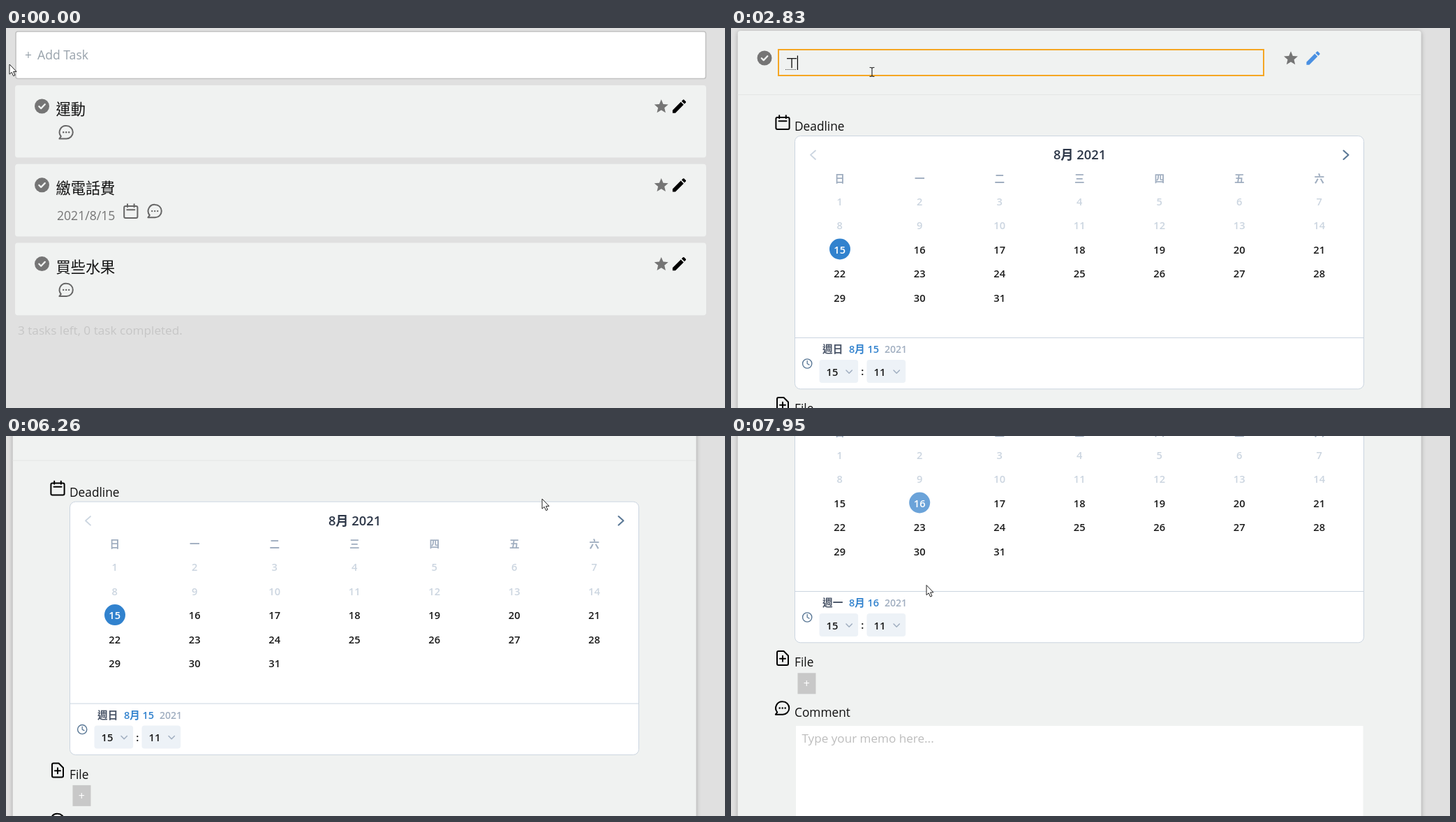
Recreate the animation shown at these times as an HTML page. Size 1030 px wide and 544 px high, loop 8 s.

```html
<!DOCTYPE html>
<html lang="zh-Hant">
<head>
<meta charset="utf-8">
<title>Task list</title>
<style>
  html, body { margin: 0; width: 100%; height: 100%; overflow: hidden; background: #e0e0e0; }
  svg { display: block; width: 100vw; height: 100vh; }
  text { font-family: "Open Sans", "Noto Sans CJK TC", "Noto Sans CJK JP", "Noto Sans CJK", sans-serif; white-space: pre; }
  .cjk { font-family: "Noto Sans CJK TC", "Noto Sans CJK JP", "Noto Sans CJK", sans-serif; font-weight: 300; }
  .semi { font-weight: 600; }
  .mid { text-anchor: middle; }
  .line { fill: none; stroke-linecap: round; stroke-linejoin: round; }
  .panel { filter: drop-shadow(0 1px 3px rgba(0, 0, 0, .28)); }
</style>
</head>
<body>
<svg id="stage" viewBox="0 0 1030 544"></svg>
<script>
const LOOP = 8000;
const CARD = '#f0f2f1', GRAY = '#757575', BLUE = '#3182ce', ORANGE = '#f5a623';
const MUTED = '#a0aec0', PALE = '#cbd5e0', SLATE = '#5a7896';

const stage = document.getElementById('stage');

function add(parent, tag, attrs = {}, content) {
  const node = document.createElementNS('http://www.w3.org/2000/svg', tag);
  for (const key in attrs) node.setAttribute(key, attrs[key]);
  if (content !== undefined) node.textContent = content;
  parent.appendChild(node);
  return node;
}
const group = (parent, x = 0, y = 0, scale = 1) =>
  add(parent, 'g', { transform: `translate(${x} ${y}) scale(${scale})` });
const rect = (parent, x, y, width, height, fill, rx = 0, more = {}) =>
  add(parent, 'rect', { x, y, width, height, fill, rx, ...more });
const label = (parent, x, y, size, fill, content, cls = '') =>
  add(parent, 'text', { x, y, 'font-size': size, fill, class: cls }, content);
const stroke = (parent, d, color, width = 2) =>
  add(parent, 'path', { d, class: 'line', stroke: color, 'stroke-width': width });
const show = (node, on) => node.setAttribute('visibility', on ? 'inherit' : 'hidden');
const place = (node, x, y) => node.setAttribute('transform', `translate(${x} ${y})`);

// Icons, each centred on x, y
function checkIcon(parent, x, y) {
  const g = group(parent, x, y);
  add(g, 'circle', { r: 10.5, fill: GRAY });
  stroke(g, 'M-4.2 .2L-1.3 3.1L4.3-2.7', CARD, 2.3);
}
function starIcon(parent, x, y) {
  const g = group(parent, x - 12, y - 11.7);
  return add(g, 'path', { fill: GRAY, d: 'M12 17.27 18.18 21l-1.64-7.03L22 9.24l-7.19-.61L12 2 9.19 8.63 2 9.24l5.46 4.73L5.82 21z' });
}
function pencilIcon(parent, x, y, fill) {
  const g = group(parent, x - 12.8, y - 12.8, 1.07);
  add(g, 'path', { fill, d: 'M3 17.25V21h3.75L17.81 9.94l-3.75-3.75L3 17.25zM20.71 7.04c.39-.39.39-1.02 0-1.41l-2.34-2.34a1 1 0 0 0-1.41 0l-1.83 1.83 3.75 3.75z' });
}
function commentIcon(parent, x, y, color) {
  const g = group(parent, x, y);
  stroke(g, 'M.6-9.2A9.2 9.2 0 1 1 .6 9.2H-9.6L-7.2 5.9A9.2 9.2 0 0 1 .6-9.2z', color);
  for (const dx of [-3.8, .2, 4.2]) add(g, 'circle', { cx: dx, r: 1.2, fill: color });
}
function calendarIcon(parent, x, y, color) {
  const g = group(parent, x, y);
  rect(g, -9.6, -7.3, 19.2, 17, 'none', 2, { stroke: color, 'stroke-width': 2 });
  stroke(g, 'M-4.8-10V-6M4.8-10V-6M-5.5-2H5.5', color);
}
function fileIcon(parent, x, y) {
  stroke(group(parent, x, y), 'M1.5-10H-6a2 2 0 0 0-2 2V8a2 2 0 0 0 2 2H6a2 2 0 0 0 2-2V-3.5zM0-3.2V4.8M-4 .8H4', '#000');
}

// Task list
const list = group(stage);
rect(list, 14, 5, 988.5, 67.5, '#fff', 3, { stroke: '#c2c2c2', 'stroke-width': 1.6 });
label(list, 27, 45, 17.4, '#98a2ab', '+');
label(list, 45, 45, 17.6, '#98a2ab', 'Add Task');
['運動', '繳電話費', '買些水果'].forEach((name, i) => {
  const card = group(list, 0, 82 + i * 112.8);
  const dated = i === 1;
  rect(card, 13, 0, 990, 103.6, CARD, 4);
  checkIcon(card, 51.5, 30);
  label(card, 71.5, 42, 21.2, '#111', name, 'cjk');
  starIcon(card, 938.7, 30);
  pencilIcon(card, 964.5, 30, '#000');
  if (dated) {
    label(card, 73, 80, 17.6, GRAY, '2021/8/15');
    calendarIcon(card, 178.8, 67.5, '#666');
  }
  commentIcon(card, dated ? 213 : 86, 67.3, '#666');
});
label(list, 17, 439, 17.2, '#c6c6c6', '3 tasks left, 0 task completed.');

// Task form
const form = group(stage);
rect(form, 9.7, 4, 979, 1000, CARD, 4, { class: 'panel' });
stroke(form, 'M10 95.5H988', '#e3e6e5', 1);
checkIcon(form, 48, 43);
const star = starIcon(form, 802, 43);
pencilIcon(form, 834, 43, '#4a90e2');

const focusBox = rect(form, 68, 31, 695, 37, 'none', 0, { stroke: ORANGE, 'stroke-width': 2 });
const hint = label(form, 78.5, 56, 17.2, '#151515', 'Type Something Here...');
const title = label(form, 78.5, 56, 17.1, '#151515', '', 'cjk');
const caret = rect(form, 0, 39.5, 1.2, 20.5, '#000');
const underline = add(form, 'path', { stroke: '#444', 'stroke-width': 1, 'stroke-dasharray': '1 1' });

calendarIcon(form, 74, 135.3, '#000');
label(form, 91, 147, 17.3, '#111', 'Deadline');

rect(form, 91.5, 154.5, 815, 362.3, '#fff', 8, { stroke: PALE });
stroke(form, 'M92 443.5H906', PALE, 1);
stroke(form, 'M121 175.5L114 181.7L121 188', PALE, 1.8);
stroke(form, 'M877.5 175.5L884.5 181.7L877.5 188', SLATE, 2.1);
label(form, 499.5, 188, 18.3, '#2d3748', '8月 2021', 'semi mid');

const dayX = col => 155.7 + col * 114.5;
const rowY = row => 248.5 + row * 34.4;
const firstDot = add(form, 'circle', { cx: 156, cy: 316.5, r: 15, fill: BLUE });
const nextDot = add(form, 'circle', { cx: 270.2, cy: 316.5, r: 15 });
[...'日一二三四五六'].forEach((d, i) => label(form, dayX(i), 220.6, 14.6, MUTED, d, 'semi mid'));
const days = [];
for (let d = 1; d <= 31; d++) {
  const col = (d - 1) % 7, row = Math.floor((d - 1) / 7);
  days[d] = label(form, dayX(col), rowY(row) + 5.4, 14.6, d < 15 ? PALE : '#1a1a1a', d, 'semi mid');
}

const clock = group(form, 109.2, 480.5);
add(clock, 'circle', { r: 6.6, fill: 'none', stroke: SLATE, 'stroke-width': 1.4 });
stroke(clock, 'M0-4V0L2.8 1.6', SLATE, 1.3);
const weekday = label(form, 131, 465.3, 14.7, '#4a5568', '', 'semi');
const monthDay = label(form, 169, 465.3, 14.5, BLUE, '', 'semi');
label(form, 220, 465.3, 14, MUTED, '2021', 'semi');
[[126.5, '15'], [194.5, '11']].forEach(([x, value]) => {
  rect(form, x, 475, 55.7, 33, '#edf2f7', 4);
  label(form, x + 10, 497.5, 14.8, '#1a1a1a', value, 'semi');
  stroke(form, `M${x + 38.5} 490l4.2 4.2l4.2-4.2`, MUTED, 1.5);
});
label(form, 188.4, 497, 15, '#1a1a1a', ':', 'semi mid');

fileIcon(form, 74, 539);
label(form, 91, 551, 17.3, '#111', 'File');
rect(form, 95.5, 560.3, 26, 30, '#c8c8c8');
label(form, 108.3, 581, 16, '#fff', '+', 'mid');
commentIcon(form, 73.5, 610.5, '#000');
label(form, 91, 623, 17.3, '#111', 'Comment');
rect(form, 93, 636, 812.5, 200, '#fff');
label(form, 101.5, 660, 17.1, '#bdbdbd', 'Type your memo here...');

// Pointer
const flash = add(stage, 'circle', { r: 13, fill: '#fff000', 'fill-opacity': .6 });
const pointer = group(stage);
const outline = { fill: '#fff', stroke: '#222', 'stroke-width': 1, 'stroke-linejoin': 'round' };
const shapes = {
  arrow: add(pointer, 'path', { ...outline, d: 'M0 0V14.2L3.2 11.3L5.6 16.6L8 15.5L5.6 10.4H10z' }),
  hand: add(pointer, 'path', { ...outline, d: 'M-1.8 1.8a1.8 1.8 0 0 1 3.6 0V7.6c1-.8 3-.6 3.3.5 1-.7 2.7-.4 3 .7 1.2-.5 2.4.1 2.4 1.6V14c0 3-1.6 3.6-1.8 6H-.4C-.8 17.5-3.8 15-5.4 11.8c-.8-1.6 1-2.6 2.2-1.5L-1.8 11.8z' }),
  beam: stroke(pointer, 'M-3-6.5Q-.3-6.5 0-5.5Q.3-6.5 3-6.5M0-5.5V5.5M-3 6.5Q-.3 6.5 0 5.5Q.3 6.5 3 6.5', '#222', 1.1)
};

// time, x, y
const route = [
  [0, 5, 52], [470, 5, 52], [830, 113, 45], [1100, 113, 45], [1290, 113, 89],
  [1340, 113, 89], [1560, 159, 53], [2030, 159, 53], [2230, 202, 63], [4510, 202, 63],
  [4570, 205, 63], [4770, 660, 5], [4840, 694, -24], [4930, 700, -24], [5250, 802, 44],
  [5500, 802, 44], [5780, 780, 78], [5850, 768, 90], [6470, 768, 90], [6800, 290, 210],
  [6930, 270, 207], [7000, 275, 208], [7350, 275, 208], [7500, 280, 213.5], [LOOP, 280, 213.5]
];
const clicks = [[930, 1060], [1830, 1960], [5310, 5450], [7200, 7330]];

// time, settled text, text still being composed
const typing = [
  [0, '', ''], [2830, '', 'ㄒ'], [2900, '', 'ㄒㄧ'], [3050, '', 'ㄒㄧㄣ'], [3120, '', '新'],
  [3500, '新', ''], [3760, '新', 'ㄖ'], [3830, '新', 'ㄖㄣ'], [3960, '新', '任ㄨ'],
  [4020, '新', '任務'], [4170, '新任務', '']
];
const OPEN = 1100, FOCUS = 1830, BLUR = 5310, STARRED = 5450, PICKED = 7330;
const HOVER = 6730;

const smooth = (t, a, b) => {
  const p = Math.min(1, Math.max(0, (t - a) / (b - a)));
  return p * p * (3 - 2 * p);
};

function pointAt(t) {
  const i = route.findIndex(k => k[0] > t);
  const [t0, x0, y0] = route[i - 1], [t1, x1, y1] = route[i];
  const p = smooth(t, t0, t1);
  return [x0 + (x1 - x0) * p, y0 + (y1 - y0) * p];
}

function shapeAt(t, x, y, scroll) {
  if (t < OPEN) return x > 14 && y > 5 && y < 72 ? 'beam' : 'arrow';
  const over = (cx, cy, r) => Math.hypot(x - cx, y + scroll - cy) < r;
  if (over(802, 43, 14) || over(270, 316.5, 21)) return 'hand';
  return x > 67 && x < 764 && y + scroll > 30 && y + scroll < 69 ? 'beam' : 'arrow';
}

function drawTitle(t) {
  const [since, done, draft] = typing.filter(k => k[0] <= t).pop();
  const whole = done + draft;
  const focused = t >= FOCUS && t < BLUR;
  show(hint, !whole);
  title.textContent = whole;
  show(focusBox, focused);

  const edge = n => 78.3 + n * 17.1;
  const blinkStart = Math.max(since, 1900);
  const lit = draft || Math.floor((t - blinkStart) / 530) % 2 < 1;
  show(caret, focused && lit);
  caret.setAttribute('x', edge(whole.length) - (whole ? .6 : 0));
  underline.setAttribute('d', draft ? `M${Math.round(edge(done.length))} 59.5H${edge(whole.length) - 1.5}` : '');
}

function drawDate(t) {
  const picked = t >= PICKED;
  show(firstDot, !picked);
  show(nextDot, t >= HOVER);
  nextDot.setAttribute('fill', picked ? '#6ba3d9' : '#e8ecf1');
  days[15].setAttribute('fill', picked ? '#1a1a1a' : '#fff');
  days[16].setAttribute('fill', picked ? '#fff' : '#1a1a1a');
  weekday.textContent = picked ? '週一' : '週日';
  monthDay.textContent = picked ? '8月 16' : '8月 15';
}

function draw(t) {
  const scroll = 107.3 * smooth(t, 6017, 6467) + 113.7 * smooth(t, 7500, 7930);
  show(list, t < OPEN);
  show(form, t >= OPEN);
  place(form, 0, -scroll);
  drawTitle(t);
  if (t < OPEN) for (const node of [hint, focusBox, caret]) show(node, false);
  drawDate(t);
  if (t < OPEN) show(firstDot, false);
  star.setAttribute('fill', t >= STARRED ? ORANGE : GRAY);

  const [x, y] = pointAt(t);
  const shape = shapeAt(t, x, y, scroll);
  place(pointer, x, y);
  for (const name in shapes) show(shapes[name], name === shape);
  place(flash, x, y);
  show(flash, clicks.some(([a, b]) => t >= a && t < b));
}

const start = performance.now();
function tick() {
  draw((performance.now() - start) % LOOP);
  requestAnimationFrame(tick);
}
tick();
</script>
</body>
</html>
```
